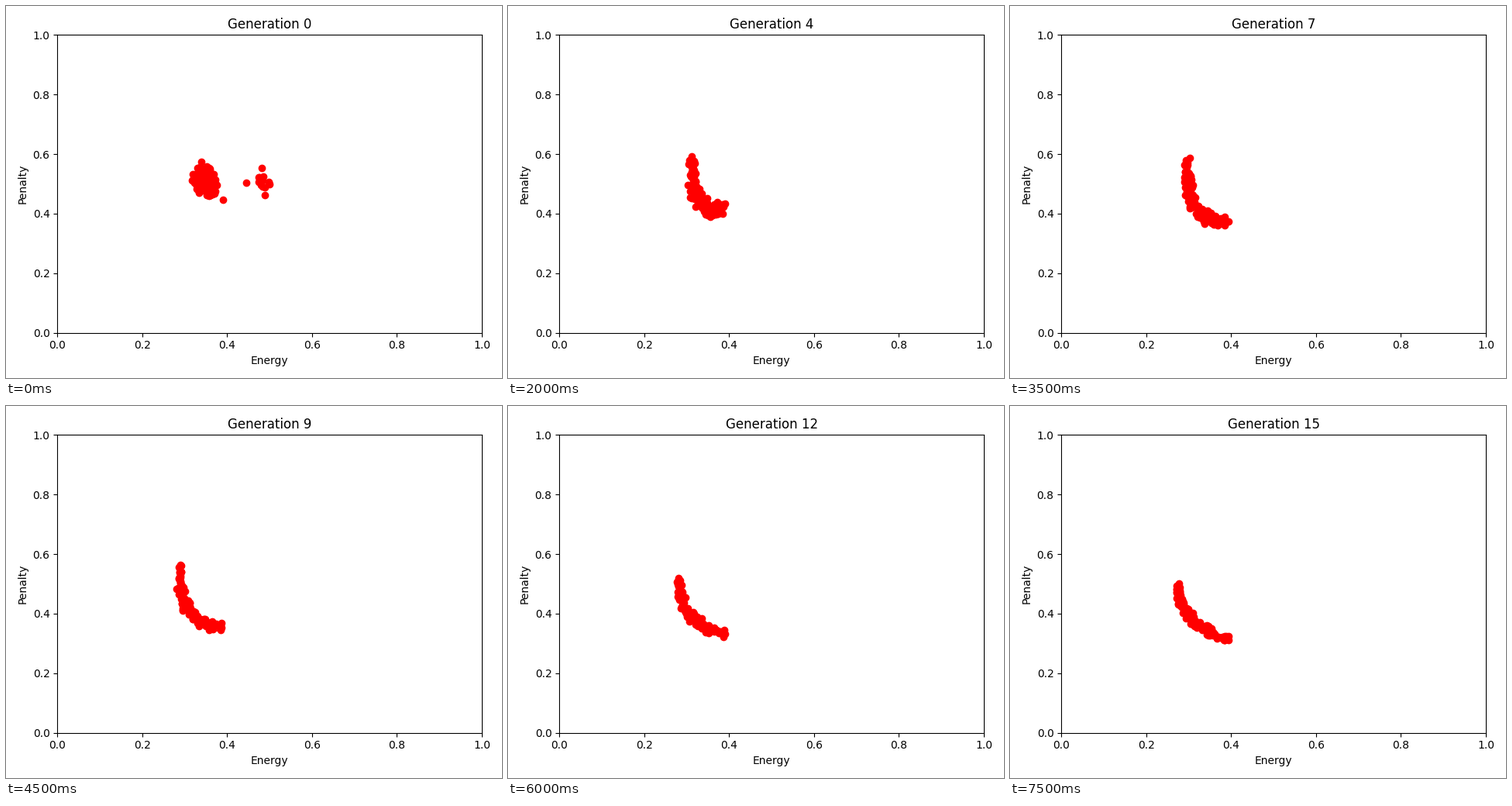
Write a matplotlib script that moves like this. It is 640 px wide and 480 px high and loops after 8 s.

```python
import numpy as np
import matplotlib.pyplot as plt
from matplotlib.animation import FuncAnimation

GENERATIONS = 16
LIFE = 3      # generations an individual survives
COHORT = 34   # individuals replaced together

# Bezier control points of the front (top, knee, right end) at key generations
KEY_GENS = [2, 4, 7, 10, 15]
KEY_FRONTS = np.array([
    [(.317, .559), (.299, .438), (.410, .447)],
    [(.315, .598), (.311, .385), (.383, .411)],
    [(.293, .587), (.290, .359), (.392, .373)],
    [(.286, .538), (.279, .370), (.388, .346)],
    [(.272, .492), (.283, .353), (.396, .314)],
])
# Outermost individuals of the first generation
OUTLIERS = [(.445, .504), (.390, .447), (.489, .463), (.481, .554), (.339, .574)]


def disc(rng, n, rx, ry):
    """Random points spread evenly over an ellipse."""
    angle = rng.uniform(0, 2 * np.pi, n)
    reach = np.sqrt(rng.uniform(0, 1, n))
    return np.column_stack([rx * reach * np.cos(angle), ry * reach * np.sin(angle)])


def founders():
    rng = np.random.default_rng(1)
    groups = [np.array(OUTLIERS)]
    for n, center, rx, ry in [(80, (.347, .508), .031, .055), (11, (.485, .509), .015, .032)]:
        spread = disc(rng, n, rx, ry)
        spread[:, 0] -= 0.12 * spread[:, 1]
        groups.append(spread + center)
    return np.vstack(groups)


def front(gen, t):
    ctrl = [[np.interp(gen, KEY_GENS, KEY_FRONTS[:, i, j]) for j in range(2)]
            for i in range(3)]
    weights = np.column_stack([(1 - t) ** 2, 2 * t * (1 - t), t ** 2])
    return weights @ np.array(ctrl)


def cohort(born):
    rng = np.random.default_rng(born + LIFE)
    t = (np.arange(COHORT) + rng.uniform(0, 1, COHORT)) / COHORT
    width = 0.3 + 0.7 * np.sin(np.pi * t)
    noise = disc(rng, COHORT, .011, .019) * width[:, None]
    return front(born + 1, t) + noise


def population(gen):
    if gen == 0:
        return founders()
    return np.vstack([cohort(gen - age) for age in range(LIFE)])


fig, ax = plt.subplots(figsize=(6.4, 4.8), dpi=100)
dots, = ax.plot([], [], "ro")
ax.set(xlim=(0, 1), ylim=(0, 1), xlabel="Energy", ylabel="Penalty")
title = ax.set_title("Generation 0")
fig.tight_layout()


def update(gen):
    dots.set_data(*population(gen).T)
    title.set_text(f"Generation {gen}")
    return dots, title


anim = FuncAnimation(fig, update, frames=GENERATIONS, interval=500,
                     repeat=True, repeat_delay=0)
plt.show()
```
